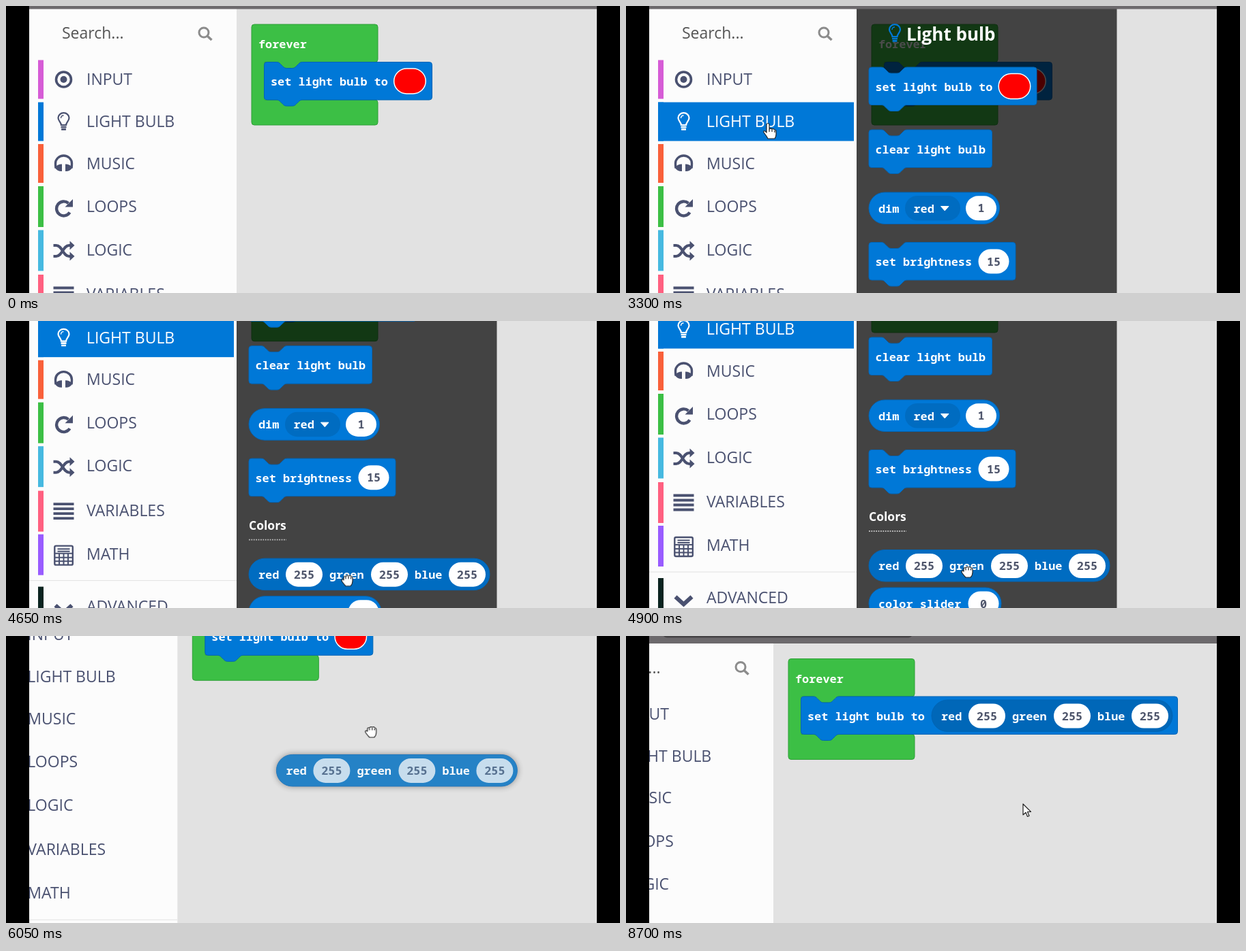
An HTML page that plays this animation: 900 px wide and 422 px high, repeating every 9 s.

```html
<!DOCTYPE html>
<html lang="en">
<head>
<meta charset="utf-8">
<title>Block editor</title>
<style>
html, body { margin: 0; height: 100%; overflow: hidden; background: #000; }
svg { display: block; width: 100vw; height: 100vh; }
text { white-space: pre; }
.menu { font: 400 23px "Open Sans", "Noto Sans", sans-serif; }
.title { font: 700 26px "Open Sans", "Noto Sans", sans-serif; fill: #fff; }
.head { font: 700 17.5px "Open Sans", "Noto Sans", sans-serif; fill: #fff; }
.code { font: 700 16.85px "Noto Sans Mono", "DejaVu Sans Mono", monospace; fill: #fff; }
.num { font: 600 16.85px "Noto Sans Mono", "DejaVu Sans Mono", monospace; fill: #4f566c; text-anchor: middle; }

/* camera */
#camX, #camY { animation: 9s infinite cubic-bezier(.3333, 0, .6667, 1); }
#camX { animation-name: pan; }
#camY { animation-name: scroll; }
@keyframes pan {
  0%, 62.222% { transform: translateX(0); }
  70%, 100% { transform: translateX(-122px); }
}
@keyframes scroll {
  0%, 46.444% { transform: translateY(0); }
  52.778%, 64.444% { transform: translateY(-158px); }
  72.222%, 100% { transform: translateY(6.5px); }
}
/* the reset at the loop point is a hard cut */

/* pointer path; the dragged block follows it a little later */
#cursor, #drag { animation: move 9s linear infinite; }
#drag { animation-delay: .1s; }
@keyframes move {
  0% { transform: translate(760px, 60px); animation-timing-function: step-end; }
  16.111% { transform: translate(760px, 60px); animation-timing-function: step-end; }
  17.778% { transform: translate(640px, 215px); animation-timing-function: step-end; }
  19.444% { transform: translate(425px, 254px); animation-timing-function: step-end; }
  20.556% { transform: translate(240px, 246px); animation-timing-function: step-end; }
  22.222%, 46.667% { transform: translate(210px, 183px); }
  47.778% { transform: translate(420px, 460px); }
  51.667%, 62.222% { transform: translate(500px, 527px); }
  63.333% { transform: translate(549px, 487px); }
  64.444% { transform: translate(613px, 404px); }
  66.667% { transform: translate(625px, 285px); animation-timing-function: ease-out; }
  71.111%, 72.778% { transform: translate(607px, 115.5px); }
  76.667% { transform: translate(694px, 115.5px); animation-timing-function: step-end; }
  90% { transform: translate(720px, 153px); animation-timing-function: step-end; }
  91.667% { transform: translate(742px, 218px); animation-timing-function: step-end; }
  92.778% { transform: translate(732px, 235px); animation-timing-function: step-end; }
  94.444% { transform: translate(712px, 239px); animation-timing-function: step-end; }
  96.667%, 100% { transform: translate(704px, 240.5px); }
}

/* things that switch on and off */
.show { visibility: hidden; animation: 9s step-end infinite; }
.arrow { animation-name: arrow; }
.point { animation-name: point; }
.grab { animation-name: grab; }
.hover-music { animation-name: hoverMusic; }
.hover-bulb { animation-name: hoverBulb; }
.open { animation-name: open; }
.held { animation-name: held; }
.before { animation-name: before; }
.after { animation-name: after; }
@keyframes arrow { 16.111%, 90% { visibility: visible; } 20.556% { visibility: hidden; } 100% { visibility: hidden; } }
@keyframes point { 20.556% { visibility: visible; } 50% { visibility: hidden; } }
@keyframes grab { 50% { visibility: visible; } 90% { visibility: hidden; } }
@keyframes hoverMusic { 20.556% { visibility: visible; } 22.222% { visibility: hidden; } }
@keyframes hoverBulb { 22.222% { visibility: visible; } 32.778% { visibility: hidden; } }
@keyframes open { 32.778% { visibility: visible; } 62.222% { visibility: hidden; } }
@keyframes held { 62.222% { visibility: visible; } 85% { visibility: hidden; } }
@keyframes before { 0% { visibility: visible; } 85% { visibility: hidden; } }
@keyframes after { 85% { visibility: visible; } }

.ghost { opacity: .84; filter: drop-shadow(0 0 5px rgba(0, 0, 0, .45)); }
.ghost .field { opacity: .76; }
.hand { fill: #fff; stroke: #222; stroke-width: 1.2; stroke-linejoin: round; }
.icon { fill: none; stroke: currentColor; }
.icon .f { fill: currentColor; stroke: none; }
</style>
</head>
<body>
<svg id="stage" viewBox="0 0 900 422"></svg>
<script>
const BLUE = '#0078d7', INK = '#4a5170';

const rect = (x, y, w, h, fill, r = 0, more = '') =>
  `<rect x="${x}" y="${y}" width="${w}" height="${h}" rx="${r}" fill="${fill}" ${more}/>`;
const text = (x, y, s, cls, more = '') => `<text x="${x}" y="${y}" class="${cls}" ${more}>${s}</text>`;
const show = (cls, body) => `<g class="show ${cls}">${body}</g>`;
const at = (x, y, body, color = INK) =>
  `<g class="icon" transform="translate(${x} ${y})" color="${color}">${body}</g>`;

// white value field, centred on cy
const field = (x, cy, w, s) => `<g class="field">${rect(x, cy - 18, w, 36, '#fff', 18)}` +
  `${text(x + w / 2, cy + 6, s, 'num')}</g>`;
const swatch = (x, cy) => rect(x, cy - 18.5, 46.5, 37, '#f00', 18.5, 'stroke="#fff" stroke-width="1.5"');
const round = (x, y, w, fill = BLUE) =>
  rect(x, y, w, 46.5, fill, 23.2, 'stroke="#0064b4" stroke-width="1"');

// puzzle edges, drawn to the right and to the left
const notch = 'c3 0 4 1 6 3l3 3c2 2 3 3 6 3h8c3 0 4-1 6-3l3-3c2-2 3-3 6-3';
const tab = 'c-3 0-4 1-6 3l-3 3c-2 2-3 3-6 3h-8c-3 0-4-1-6-3l-3-3c-2-2-3-3-6-3';
const stack = (x, y, w) => `<path fill="${BLUE}" stroke="#0064b4" d="M${x + 4} ${y}h14${notch}H${x + w - 4}` +
  `q4 0 4 4v47.5q0 4-4 4H${x + 56}${tab}h-14q-4 0-4-4v-47.5q0-4 4-4z"/>`;

const rgb = (x, y, fill) => {
  const cy = y + 23.5;
  return round(x, y, 353, fill) +
    [['red', 14, 54], ['green', 118, 179], ['blue', 243, 293]].map(([s, tx, fx]) =>
      text(x + tx, cy + 6, s, 'code') + field(x + fx, cy, 54, 255)).join('');
};

const icons = {
  target: '<circle r="11" stroke-width="3.6"/><circle r="5" class="f"/>',
  bulb: '<path stroke-width="2.2" d="M-3.6 5C-3.6 1-8-1-8-5.5A8 7.3 0 0 1 8-5.5C8-1 3.6 1 3.6 5z"/>' +
    '<path stroke-width="1.4" d="M-4-5q0-4 4-4"/><path stroke-width="2.6" d="M-4 8H4M-3.4 11.4H3.4"/>',
  phones: '<path stroke-width="3.4" d="M-11.5 8Q-12 5-12 1A12 11.5 0 0 1 12 1Q12 5 11.5 8"/>' +
    '<path class="f" d="M-2.5 2V12.5Q-9 13-13 7Q-9 2-2.5 2zM2.5 2V12.5Q9 13 13 7Q9 2 2.5 2z"/>',
  repeat: '<path stroke-width="4.4" d="M9 6.5A10.5 10.5 0 1 1 7-7"/><path class="f" d="M13.5-13V-1.5H2z"/>',
  shuffle: '<path stroke-width="4" d="M-15-8h4C-2-8-1 8 8 8h3M-15 8h4C-2 8-1-8 8-8h3"/>' +
    '<path class="f" d="M9-14.5L16-8 9-1.5zM9 1.5L16 8 9 14.5z"/>',
  bars: '<path stroke-width="3.8" d="M-15-10.5H15M-15-3.5H15M-15 3.5H15M-15 10.5H15"/>',
  calc: '<rect x="-13.2" y="-14" width="26.5" height="28" rx="2" stroke-width="2.4"/>' +
    '<path stroke-width="2" d="M-9-9.5H9M-9-6H9M-13-3H13M-13 3H13M-13 8.5H13M-6.5-3V14M0-3V14M6.5-3V14"/>',
  chevron: '<path stroke-width="6" d="M-12-5.5L0 5.5 12-5.5"/>'
};

// label, bar top, bar height, bar colour, baseline, icon, icon y
const rows = [
  ['INPUT', 79.5, 57, '#d65cd6', 116, 'target', 108],
  ['LIGHT BULB', 141.5, 57, BLUE, 178, 'bulb', 170],
  ['MUSIC', 203, 57, '#f9603a', 239.5, 'phones', 230.5],
  ['LOOPS', 265, 60, '#3cbf45', 303, 'repeat', 297],
  ['LOGIC', 329.5, 60, '#46b9e0', 366.5, 'shuffle', 360],
  ['VARIABLES', 395, 60, '#ff6080', 432, 'bars', 425],
  ['MATH', 459, 60, '#995cff', 496, 'calc', 490],
  ['ADVANCED', 536, 60, '#0b2420', 573, 'chevron', 569]
];
const label = (r, color) => at(84.5, r[6], icons[r[5]], color) + text(118, r[4], r[0], 'menu', `fill="${color}"`);

const sidebar = rect(-200, 0, 538, 700, '#fcfcfc') +
  text(82, 48, 'Search...', 'menu', 'fill="#555"') +
  at(290, 39, '<circle r="7" stroke-width="3"/><path stroke-width="3.6" d="M5 5L11.5 11"/>', '#8c8c8c') +
  rect(-200, 526.5, 538, 1, '#e2e2e2') +
  show('hover-music', rect(55, 203, 279, 57, '#dfdcde')) +
  show('hover-bulb', rect(55, 141.5, 279, 57, '#dfdcde')) +
  rows.map(r => rect(47, r[1], 8, r[2], r[3]) + label(r, INK)).join('') +
  show('open', rect(47, 141.5, 287, 57, BLUE) + label(rows[1], '#fff'));

const program = `<path fill="#3cbf45" stroke="#2f9f38" d="M364 27H541q4 0 4 4V78.5q0 4-4 4H434.5${tab}H379V138` +
  'H541q4 0 4 4V171q0 4-4 4H364q-4 0-4-4V31q0-4 4-4z"/>' +
  text(370, 62, 'forever', 'code') +
  show('before', stack(378.5, 82.5, 246) + swatch(568.7, 110.5)) +
  show('after', stack(378.5, 82.5, 552) + rgb(570, 87.5, '#0067b8')) +
  text(388, 117, 'set light bulb to', 'code');

const palette = rect(338, 4, 381.5, 700, '#000', 0, 'fill-opacity=".705"') +
  at(394, 40, icons.bulb, BLUE) + text(411, 51, 'Light bulb', 'title') +
  stack(356, 90, 246) + text(365.5, 124.5, 'set light bulb to', 'code') + swatch(546.2, 118) +
  stack(356, 182, 180.5) + text(365.5, 216.5, 'clear light bulb', 'code') +
  round(356, 274, 191.5) + text(370, 303.5, 'dim', 'code') +
  rect(409, 279, 81, 36.5, '#006cc1', 18) + text(421.5, 303.5, 'red', 'code') +
  '<path fill="#fff" d="M461.5 294.5h11.5l-5.75 6.5z" stroke="#fff" stroke-linejoin="round"/>' +
  field(498, 297.3, 45, 1) +
  stack(356, 347.5, 215) + text(365.5, 382, 'set brightness', 'code') + field(516.5, 375.5, 45, 15) +
  text(356, 452, 'Colors', 'head') +
  '<path d="M356 467H411" stroke="#bbb" stroke-width="1.8" stroke-dasharray="1.8 1.6"/>' +
  rgb(356, 494.5, '#006cc1') +
  round(356, 550, 194) + text(370, 579.5, 'color slider', 'code') + field(501.5, 573.5, 45, 0);

const cursor =
  show('arrow', '<path class="hand" d="M0 0V16l4-3.5 2.5 6 2.5-1-2.5-6h5z"/>') +
  show('point', '<path class="hand" d="M-4-9q2-3 4 0v7q2-2 4 0 2-1 4 1 2 0 2 2v5q0 3-2 6h-10q-2-4-6-9-1-3 2-2l2 2z"/>' +
    '<path class="hand" d="M0-2v4M4-1.500v3.500M8 0v3"/>') +
  show('grab', '<path class="hand" d="M-5-4q0-3 3-2 1-2 4-1 3-1 4 1 2 0 2 3v4q0 4-3 7h-7q-2-2-5-6-2-3 0-4 1 0 2 1z"/>' +
    '<path class="hand" d="M-2-5.500v3M2-6v3.500M5.500-5v2.500"/>');

document.getElementById('stage').innerHTML =
  rect(34, 0, 832, 422, '#e2e2e2') +
  `<g id="camX"><g id="camY">${program}${sidebar}${show('open', palette)}` +
  rect(-200, -200, 1400, 204.5, '#6c696c') + rect(176, -40, 366, 36, '#474547', 6) +
  `<g id="drag"><g class="show held"><g class="ghost" transform="translate(-139 -30)">${rgb(0, 0, '#006fc0')}</g></g></g>` +
  `<g id="cursor">${cursor}</g></g></g>` +
  rect(0, 0, 34, 422, '#000') + rect(866, 0, 34, 422, '#000');
</script>
</body>
</html>
```
